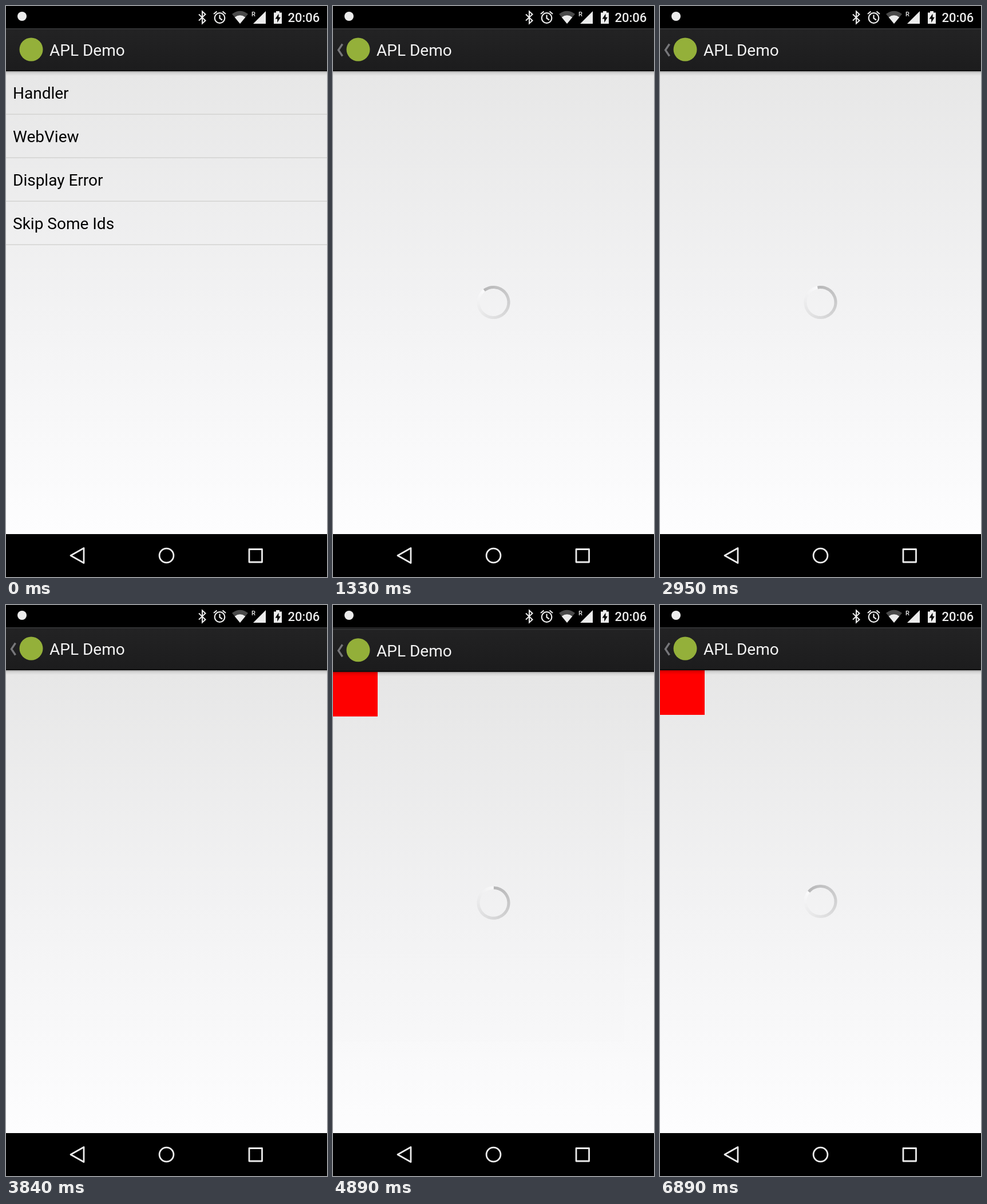
Animation, 561 px wide and 998 px high, one loop 6.91 s. Source, as an HTML page:

```html
<!DOCTYPE html>
<html lang="en">
<head>
<meta charset="utf-8">
<title>APL Demo</title>
<style>
  html, body { margin: 0; width: 100%; height: 100%; overflow: hidden; background: #000; }
  svg { display: block; width: 100vw; height: 100vh; }
  text { font-family: Roboto, sans-serif; font-size: 28px; }
</style>
</head>
<body>
<svg viewBox="0 0 561 998" xmlns="http://www.w3.org/2000/svg">
  <defs>
    <linearGradient id="page" x1="0" y1="0" x2="0" y2="1">
      <stop offset="0" stop-color="#e7e7e7"/>
      <stop offset=".5" stop-color="#f2f2f3"/>
      <stop offset="1" stop-color="#fdfdfe"/>
    </linearGradient>
    <linearGradient id="barFill" x1="0" y1="0" x2="0" y2="1">
      <stop offset="0" stop-color="#232324"/>
      <stop offset="1" stop-color="#1c1c1d"/>
    </linearGradient>
    <linearGradient id="shade" x1="0" y1="0" x2="0" y2="1">
      <stop offset="0" stop-opacity=".28"/>
      <stop offset=".4" stop-opacity=".08"/>
      <stop offset="1" stop-opacity="0"/>
    </linearGradient>
    <clipPath id="screen"><path d="M0 39H561V923H0z"/></clipPath>
    <g id="bar">
      <rect y="114" width="561" height="8" fill="url(#shade)"/>
      <rect y="39" width="561" height="75" fill="url(#barFill)"/>
      <rect y="39" width="561" height="1.5" fill="#38393b"/>
      <rect y="112" width="561" height="2" fill="#0e0e0e"/>
      <circle cx="44" cy="76" r="20.5" fill="#94b03a"/>
      <text x="76" y="87" fill="#f3f3f3">APL Demo</text>
    </g>
  </defs>

  <rect width="561" height="998"/>
  <g clip-path="url(#screen)">
    <g id="list">
      <rect y="39" width="561" height="884" fill="#e7e7e7"/>
      <rect y="114" width="561" height="809" fill="url(#page)"/>
      <g id="rows"></g>
      <use href="#bar"/>
    </g>
    <g id="detail">
      <rect y="114" width="561" height="809" fill="url(#page)"/>
      <rect id="block" y="114" width="78" height="78" fill="#f00"/>
      <g id="spinner" fill="none" stroke-width="5"></g>
      <use href="#bar"/>
      <path d="M16.5 66.5L9.5 77L16.5 87.5" fill="none" stroke="#77777a" stroke-width="3.4"/>
    </g>
  </g>

  <!-- status bar -->
  <g fill="#ececec">
    <circle cx="28" cy="18" r="8"/>
    <path d="M337 14.5L348.5 25.5L343 30.5V9.5L348.5 14.5L337 25.5" fill="none" stroke="#ececec" stroke-width="2"/>
    <g fill="none" stroke="#ececec" stroke-width="2.2">
      <circle cx="373.5" cy="21" r="8.8"/>
      <path d="M373.5 15.5V21.5L378 24.5M363 14L368.5 9.5M384 14L378.5 9.5"/>
    </g>
    <path d="M395 14Q409 3.500 423 14L409 31z" fill="#4a4a4a"/>
    <path d="M399.700 19.700Q409 13 418.300 19.700L409 31z"/>
    <text x="429" y="18" style="font-size:11px;font-weight:500" fill="#ececec">R</text>
    <path d="M454 9V31H432z"/>
    <path d="M472 9H478V11.500H482V31H468V11.500H472z"/>
    <path d="M476.500 13.500L470.500 22.500H474.200V29L479.800 19.800H476.500z" fill="#000"/>
    <text x="492.500" y="28" style="font-size:22px;font-weight:500" fill="#ececec">20:06</text>
  </g>

  <!-- navigation bar -->
  <g fill="none" stroke="#ececec" stroke-width="2.800" stroke-linejoin="round">
    <path d="M113 960.500L136 947.500V973.500z"/>
    <circle cx="280.500" cy="960.500" r="12.400"/>
    <rect x="425" y="949.500" width="22.500" height="22.500"/>
  </g>
</svg>
<script>
const LOOP = 6910;
const CENTER = [280.5, 518];
const $ = id => document.getElementById(id);

function add(parent, tag, attrs, text) {
  const el = document.createElementNS('http://www.w3.org/2000/svg', tag);
  for (const key in attrs) el.setAttribute(key, attrs[key]);
  if (text) el.textContent = text;
  parent.appendChild(el);
}

['Handler', 'WebView', 'Display Error', 'Skip Some Ids'].forEach((label, i) => {
  add($('rows'), 'text', { x: 12, y: 162 + 76 * i }, label);
  add($('rows'), 'rect', { y: 188.5 + 76 * i, width: 561, height: 1.4, fill: '#d2d2d0' });
});

// Ring fading clockwise from grey to white, drawn tail first so the head stays crisp.
const SEGMENTS = 90, RADIUS = 26.5;
const ringPoint = deg => {
  const a = deg * Math.PI / 180;
  return (RADIUS * Math.sin(a)).toFixed(2) + ' ' + (-RADIUS * Math.cos(a)).toFixed(2);
};
for (let i = SEGMENTS - 1; i >= 0; i--) {
  const step = 360 / SEGMENTS, from = i * step;
  const to = from + step + (i < SEGMENTS - 1 ? 1 : 0);
  const v = Math.round(183 + 68 * i / SEGMENTS);
  add($('spinner'), 'path', {
    d: `M${ringPoint(from)}A${RADIUS} ${RADIUS} 0 0 1 ${ringPoint(to)}`,
    stroke: `rgb(${v},${v},${v + 1})`
  });
}

const clamp = x => Math.min(1, Math.max(0, x));
const easeOut = (x, power) => 1 - (1 - clamp(x)) ** power;

// Two visits to the detail page; the second is cut off by the loop.
const visits = [
  { open: 960, done: 3170, close: 3840, end: 4140, phase: 236, block: false },
  { open: 4720, done: LOOP, close: LOOP, end: LOOP, phase: 287, block: true }
];
const SHIFT = 80;

function draw(t) {
  const visit = visits.find(v => t >= v.open && t < v.end);
  let alpha = 0, shift = 0, listAlpha = 1;
  if (visit) {
    if (t < visit.close) {
      const age = t - visit.open;
      alpha = easeOut(age / 200, 3);
      shift = SHIFT * (1 - easeOut(age / 350, 5));
      listAlpha = 1 - 0.3 * easeOut(age / 217, 2);
    } else {
      const p = clamp((t - visit.close) / (visit.end - visit.close));
      alpha = 1 - clamp((p - 0.4) / 0.6);
      shift = SHIFT * p ** 4;
      listAlpha = 0.7 + 0.3 * easeOut(p, 2);
    }
    const angle = visit.phase - t * 720 / 3500;
    $('spinner').setAttribute('transform', `translate(${CENTER}) rotate(${angle})`);
    $('spinner').setAttribute('visibility', t < visit.done ? 'inherit' : 'hidden');
    $('block').setAttribute('visibility', visit.block ? 'inherit' : 'hidden');
  }
  $('list').setAttribute('opacity', listAlpha);
  $('detail').setAttribute('opacity', alpha);
  $('detail').setAttribute('transform', `translate(0 ${shift})`);
}

const start = performance.now();
function tick() {
  draw((performance.now() - start) % LOOP);
  requestAnimationFrame(tick);
}
tick();
</script>
</body>
</html>
```
